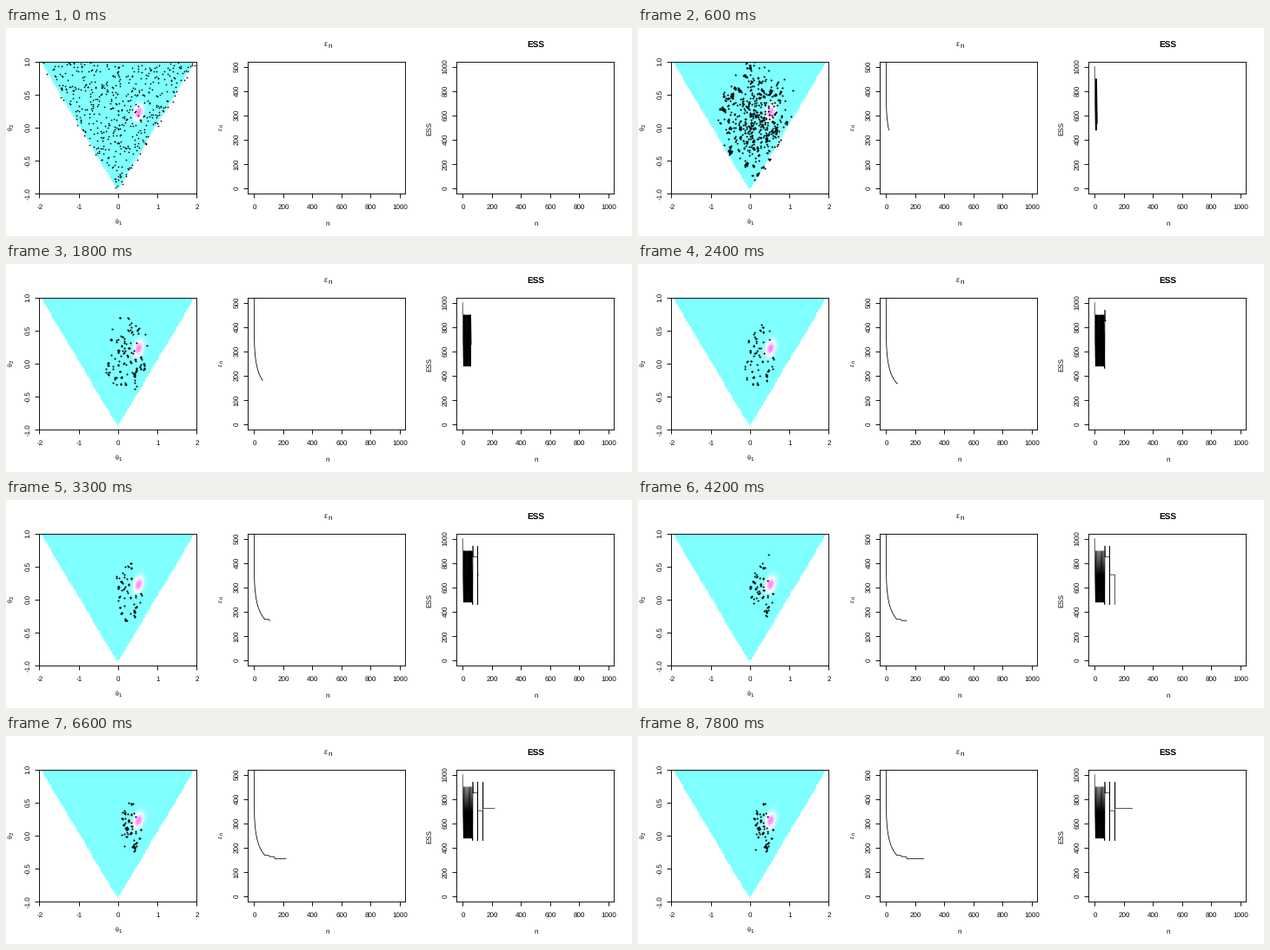
A matplotlib script that plays this animation: 720 px wide and 240 px high, repeating every 8 s.

```python
import numpy as np
import matplotlib.pyplot as plt
from matplotlib.animation import FuncAnimation

W, H = 720, 240
LEFT, RIGHT, TOP, BOTTOM = 38.4, 219.4, 39, 191
PANEL = 240
SMALL, LARGE = 7.95, 9.5
STEPS, TICKS_PER_STEP = 27, 3

plt.rcParams.update({"font.family": "Liberation Sans", "text.hinting": "none",
                     "text.hinting_factor": 1})
fig = plt.figure(figsize=(W / 72, H / 72), dpi=72, facecolor="white")


def label(x, y, text, size=SMALL, turn=0, **kw):
    """Text centred on x (or on y when turned), resting on its baseline."""
    fig.text(x / W, 1 - y / H, text, fontsize=size, rotation=turn, ha="center",
             va="baseline", rotation_mode="anchor", **kw)


def symbol(x, y, greek, sub, size=SMALL, turn=0):
    """Greek letter with a subscript, running right or upwards."""
    gap, drop = 0.5 * size, 0.2 * size
    label(x, y, greek, size, turn, family="Liberation Serif")
    if turn:
        label(x + drop, y - gap, sub, 0.8 * size, turn)
    else:
        label(x + gap, y + drop, sub, 0.8 * size)


def panel(index, xlim, ylim, xticks, yticks, yformat):
    x0 = index * PANEL
    ax = fig.add_axes([(x0 + LEFT) / W, 1 - BOTTOM / H,
                       (RIGHT - LEFT) / W, (BOTTOM - TOP) / H])
    ax.set(xlim=xlim, ylim=ylim, xticks=xticks, yticks=yticks)
    ax.tick_params(length=4.75, width=0.9, labelbottom=False, labelleft=False)
    for spine in ax.spines.values():
        spine.set_linewidth(0.9)
    for t in xticks:
        px = LEFT + (t - xlim[0]) / (xlim[1] - xlim[0]) * (RIGHT - LEFT)
        label(x0 + px + 0.5, 209, f"{t}")
    for t in yticks:
        py = BOTTOM - (t - ylim[0]) / (ylim[1] - ylim[0]) * (BOTTOM - TOP)
        label(x0 + 27.6, py - 0.3, format(t, yformat), turn=90)
    return ax


def density_image():
    """Posterior on a coarse grid: cyan through white to magenta."""
    cells = np.arange(-50, 51)
    gx, gy = np.meshgrid(cells * 0.04, cells * 0.02)
    u, v, rho = (gx - 0.53) / 0.09, (gy - 0.23) / 0.085, 0.35
    p = np.exp(-(u * u - 2 * rho * u * v + v * v) / (2 * (1 - rho ** 2)))
    rgba = np.ones(gx.shape + (4,))
    rgba[..., 0] = 0.5 + np.minimum(p, 0.5)
    rgba[..., 1] = 1 - np.maximum(p - 0.5, 0)
    rgba[..., 3] = np.abs(gx) < gy + 0.96 - 1e-9
    return rgba


def inside(p):
    return (np.abs(p[:, 0]) < 1 + p[:, 1]) & (p[:, 1] < 1)


def particle_clouds():
    """Particle positions per step: a shrinking cloud with ever fewer moves."""
    rng = np.random.default_rng(4)
    p = rng.uniform((-2, -1), (2, 1), (1000, 2))
    p = p[inside(p)]
    clouds = [p]
    for k in range(1, STEPS):
        count = int(75 + 650 * np.exp(-(k / 4.6) ** 3))
        mean = np.array([0.37 - 0.36 * np.exp(-k / 9), 0.13])
        sd = np.array([0.11 + 0.38 * np.exp(-k / 4.5), 0.16 + 0.3 * np.exp(-k / 5)])
        near = p[np.hypot(*((p - mean) / sd).T) < 2.4]
        kept = near[:int(count * (1 - np.exp(-k / 6)))]
        fresh = rng.normal(mean, sd, (3 * count, 2))
        fresh = fresh[inside(fresh)][:count - len(kept)]
        # Resampled particles sit close beside their parents.
        twins = len(fresh) // 3
        parents = kept[rng.integers(len(kept), size=twins)]
        fresh[:twins] = parents + rng.normal(0, 0.018, (twins, 2))
        p = np.vstack([kept, fresh])
        clouds.append(p)
    return clouds


STALLS = (69, 102, 139)
PLATEAUS = np.array([850, 705, 725])


def tolerance(n):
    """Logarithmic descent that stalls, then drops twice more."""
    falling = 278 - 54 * np.log(np.minimum(n, 75) / 10) + 300 * np.exp(2 - 2 * n)
    first, second = (np.clip((n - start) / 6, 0, 1) for start in STALLS[1:])
    return falling - 5 * first - 9 * second


def sample_size(n):
    """Decay by 0.9 with resampling every seventh step, then long plateaus."""
    size = 1000 * 0.9 ** np.where(n == 0, 0, (n - 1) % 7 + 1)
    for start, plateau in zip(STALLS, PLATEAUS):
        size[n > start] = plateau
        size[n == start + 1] = 460
        size[n == start + 2] = 940
    return size


thousand = range(0, 1001, 200)
theta_ax = panel(0, (-2, 2), (-1, 1), range(-2, 3), np.arange(-2, 3) / 2, ".1f")
eps_ax = panel(1, (-40, 1040), (-20, 520), thousand, range(0, 501, 100), "d")
ess_ax = panel(2, (-40, 1040), (-40, 1040), thousand, thousand, "d")

symbol(127.2, 225.5, "θ", "1")
symbol(7.5, 116.5, "θ", "2", turn=90)
symbol(368, 21, "ε", "n", LARGE)
symbol(248.5, 116.5, "ε", "n", turn=90)
label(369.5, 227.7, "n")
label(609.5, 227.7, "n")
label(609.5, 23, "ESS", LARGE, weight="bold")
label(489.2, 115.6, "ESS", turn=90)

theta_ax.imshow(density_image(), extent=(-2.02, 2.02, -1.01, 1.01), origin="lower",
                aspect="auto", interpolation="nearest")
theta_ax.set(xlim=(-2, 2), ylim=(-1, 1))
dots = theta_ax.scatter([], [], color="black", linewidths=0, zorder=2)
eps_line, = eps_ax.plot([], [], color="black", linewidth=0.8)
ess_line, = ess_ax.plot([], [], color="black", linewidth=0.65)
clouds = particle_clouds()


def draw(frame):
    step = frame // TICKS_PER_STEP
    n = np.arange(10 * step + 1)
    dots.set_offsets(clouds[step])
    dots.set_sizes([4.2 if step else 2.9])
    eps_line.set_data(n[1:], tolerance(n[1:]))
    ess_line.set_data(n, sample_size(n))
    return dots, eps_line, ess_line


anim = FuncAnimation(fig, draw, frames=80, interval=100, repeat=True, repeat_delay=0)
plt.show()
```
